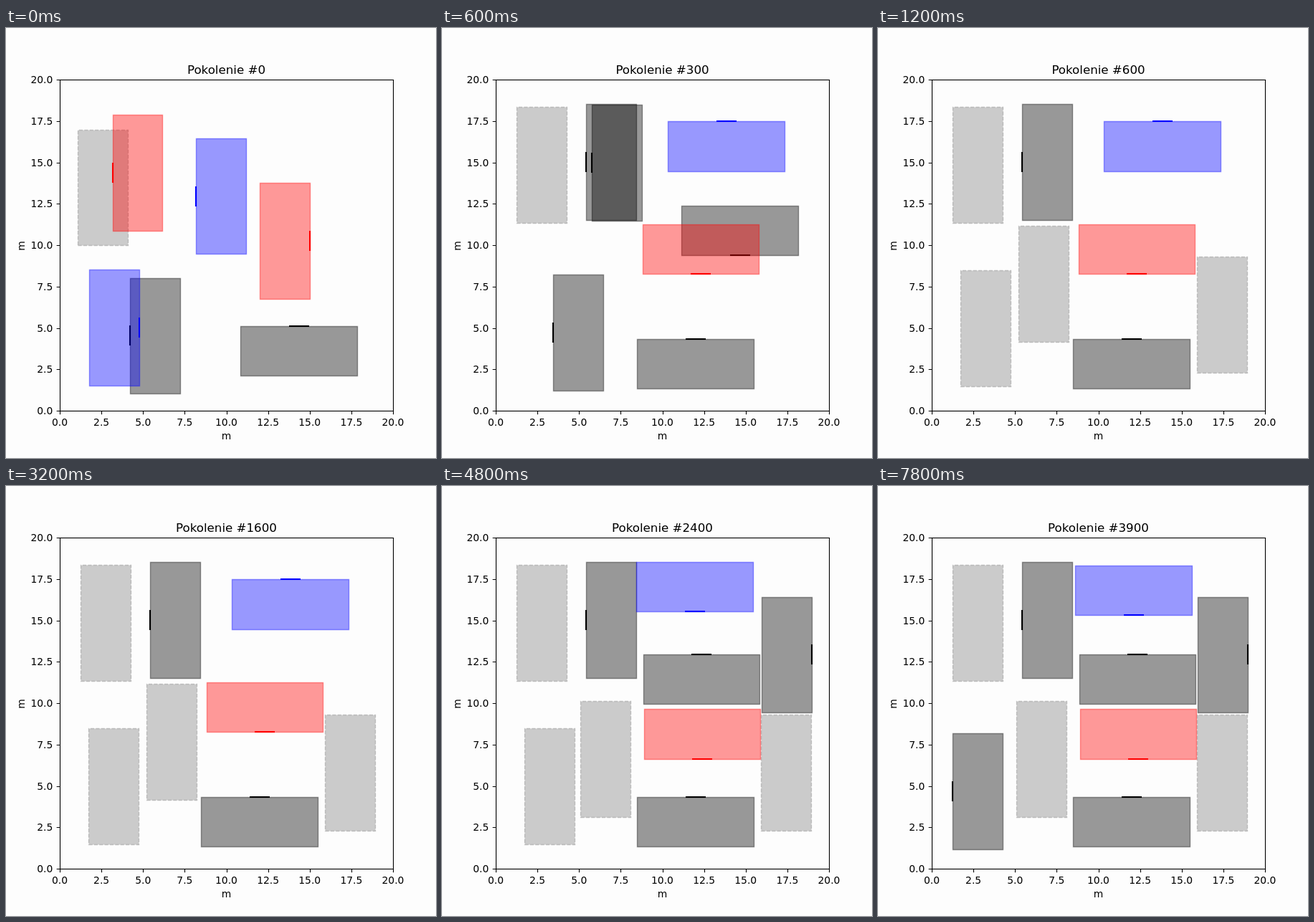
Write an HTML page that moves like this. It is 600x600 px and loops after 8 s.

```html
<!DOCTYPE html>
<html lang="pl">
<head>
<meta charset="utf-8">
<style>
  html, body { margin: 0; width: 100%; height: 100%; overflow: hidden; background: #fdfdfd; }
  svg { display: block; width: 100%; height: 100%; }
  text { font: 13.89px "DejaVu Sans", sans-serif; text-anchor: middle; }
  #title { font-size: 16.67px; }
  .axis { fill: none; stroke: #000; stroke-width: 1.11; }
</style>
</head>
<body>
<svg id="stage" viewBox="0 0 600 600"></svg>
<script>
const stage = document.getElementById('stage');
const LOOP = 8000, STEP = 200, GENERATIONS = 100;
const LONG = 7, SHORT = 3;               // metres
const SCALE_X = 23.25, SCALE_Y = 23.1;   // pixels per metre
const ALWAYS = 1e6;

// [colour, left, top, door side ('' = upright, no door), first generation, end generation]
const BOXES = [
  ['gray', 100.3, 141.6, '', 0, 200],
  ['black', 173.3, 348.6, 'L', 0, 200],
  ['black', 327.3, 416, 'T', 0, 200],
  ['blue', 116.3, 337.2, 'R', 0, 200],
  ['blue', 265.2, 153.7, 'L', 0, 200],
  ['red', 148.6, 121.2, 'L', 0, 200],
  ['red', 354.2, 216.2, 'R', 0, 200],

  ['gray', 104.2, 110.2, '', 200, ALWAYS],
  ['black', 201.2, 106.2, 'L', 200, ALWAYS],
  ['black', 209.2, 107.2, 'L', 200, 500],
  ['black', 334.2, 248, 'B', 200, 500],
  ['black', 155.2, 344.2, 'L', 200, 500],
  ['black', 272.2, 434, 'T', 200, ALWAYS],

  ['gray', 196.2, 276.2, '', 500, 1900],
  ['gray', 115.2, 338.2, '', 500, 2700],
  ['gray', 445.2, 319.2, '', 500, ALWAYS],
  ['black', 446.2, 154.6, 'R', 1900, ALWAYS],
  ['black', 280.6, 235, 'T', 1900, ALWAYS],
  ['gray', 193.2, 300.2, '', 2200, ALWAYS],
  ['black', 104.2, 345.2, 'L', 2700, ALWAYS],

  ['blue', 315.2, 130.4, 'T', 200, 1900],
  ['blue', 271.2, 106, 'B', 1900, 3300],
  ['blue', 275.2, 111, 'B', 3300, ALWAYS],
  ['red', 279.6, 274, 'B', 200, 1800],
  ['red', 281.6, 311.4, 'B', 1800, ALWAYS],
];

function add(parent, tag, attributes, text = '') {
  const node = document.createElementNS('http://www.w3.org/2000/svg', tag);
  for (const name in attributes) node.setAttribute(name, attributes[name]);
  node.textContent = text;
  return parent.appendChild(node);
}

function addBox([color, left, top, side, from, to]) {
  const flat = side === 'T' || side === 'B';
  const width = (flat ? LONG : SHORT) * SCALE_X;
  const height = (flat ? SHORT : LONG) * SCALE_Y;
  const [x0, x1, y0, y1] = [left, left + width, top, top + height].map(Math.round);
  const group = add(stage, 'g', {});

  add(group, 'path', {
    d: `M${x0 + .5} ${y1 + .5}H${x1 + .5}V${y0 + .5}H${x0 + .5}Z`,
    fill: color, 'fill-opacity': .4,
    stroke: color, 'stroke-opacity': .4, 'stroke-width': 1.39,
    'stroke-dasharray': side ? 'none' : '5.14 2.22',
  });

  if (side) {
    const start = flat
      ? [Math.round(left + width / 2) - 14, side === 'T' ? y0 : y1]
      : [side === 'L' ? x0 : x1, Math.round(top + height / 2) - 14];
    add(group, 'path', {
      d: `M${start}${flat ? 'h' : 'v'}28`, stroke: color, 'stroke-width': 2.08,
    });
  }
  return { group, from, to };
}

const boxes = BOXES.map(addBox);

add(stage, 'rect', { class: 'axis', x: 75.5, y: 72.5, width: 465, height: 462 });
for (let value = 0; value <= 20; value += 2.5) {
  const x = 75 + value * SCALE_X, y = 534 - value * SCALE_Y;
  const label = value.toFixed(1);
  add(stage, 'path', {
    class: 'axis',
    d: `M${Math.round(x) + .5} 534.5v4.86M75.5 ${Math.round(y) + .5}h-4.86`,
  });
  add(stage, 'text', { x, y: 555 }, label);
  add(stage, 'text', { x: 65.3, y: y + 5.2, style: 'text-anchor: end' }, label);
}
add(stage, 'text', { x: 307.5, y: 574 }, 'm');
add(stage, 'text', { transform: 'translate(26 304) rotate(-90)' }, 'm');
const title = add(stage, 'text', { id: 'title', x: 307.5, y: 63.7 });

function draw(now) {
  const generation = Math.floor(now % LOOP / STEP) * GENERATIONS;
  title.textContent = `Pokolenie #${generation}`;
  for (const { group, from, to } of boxes) {
    group.style.display = generation >= from && generation < to ? '' : 'none';
  }
}

const begin = performance.now();
function tick() {
  draw(performance.now() - begin);
  requestAnimationFrame(tick);
}
tick();
</script>
</body>
</html>
```
